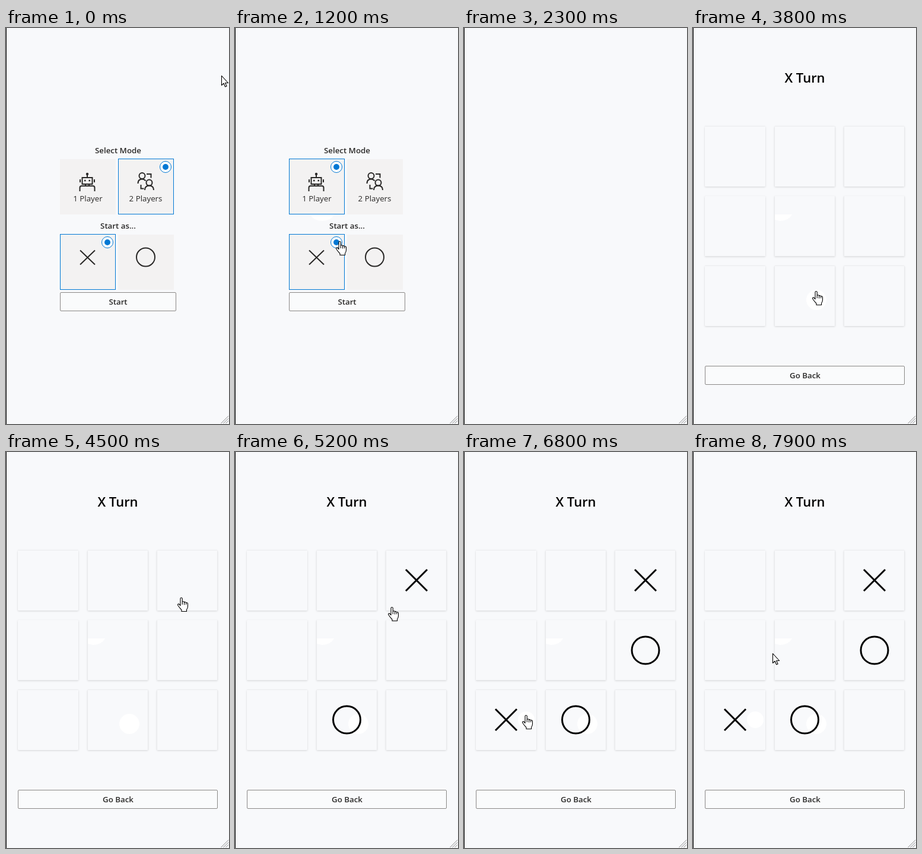
Write an HTML page that moves like this. It is 376 px wide and 667 px high and loops after 8 s.

```html
<!DOCTYPE html>
<html lang="en">
<head>
<meta charset="utf-8">
<title>Tic-tac-toe</title>
<style>
html, body { margin: 0; width: 100%; height: 100%; overflow: hidden; background: #f8f9fb; }
svg { display: block; width: 376px; height: 667px; font: 13.3px "Open Sans", "Noto Sans", sans-serif; }
text { text-anchor: middle; fill: #292827; }
.b { font-weight: 600; }
.line { fill: none; stroke: #292827; stroke-width: 2; }
.mark { fill: none; stroke: #000; stroke-width: 3; }
.tile { fill: #f3f2f2; }
.pick { fill: none; stroke: #0078d4; }
.button { fill: #fafbfc; stroke: #8a8886; }
.cell { fill: #f8f9fb; filter: drop-shadow(0 1.6px 1.8px #0002) drop-shadow(0 .3px .5px #0002); }
.glow { fill: #fff; }
.cursor { fill: #fff; stroke: #000; stroke-width: 1.1; stroke-linejoin: round; }
</style>
</head>
<body>
<svg viewBox="0 0 376 667">
  <defs>
    <g id="pick">
      <rect class="pick" x=".5" y=".5" width="93" height="93"/>
      <circle cx="80" cy="14" r="9.5" fill="#fff" stroke="#0078d4"/>
      <circle cx="80" cy="14" r="5" fill="#0078d4"/>
    </g>
    <path id="x" class="mark" d="M-18-18 18 18M18-18-18 18"/>
    <circle id="o" class="mark" r="23"/>
  </defs>

  <g id="menu">
    <path id="menuGlow" class="glow" d="M126 314h42q-7 11-21 11t-21-11"/>
    <text class="b" x="189" y="211">Select Mode</text>
    <text class="b" x="189" y="338">Start as...</text>
    <path class="tile" d="M91 221h94v93h-94zM189 221h94v93h-94zM91 348h94v93h-94zM189 348h94v93h-94z"/>
    <g class="line">
      <path d="M128.500 252h17v11h-17zM137 252v-5M125 255v5M149 255v5M134 263v3M140 263v3M124.500 275v-6q0-3 3-3h19q3 0 3 3v6"/>
      <path d="M132 257h2.500M139.500 257h2.500" stroke-width="2.600"/>
      <circle cx="137" cy="246" r="1.200"/>
      <circle cx="229.500" cy="249" r="5"/>
      <path d="M222.500 262q0-7.500 7-7.500 4 0 6 3M237 246h7.500v6.500M227.500 264v6.500h5"/>
      <circle cx="241.500" cy="260.500" r="5"/>
      <path d="M234 273q0-7.500 7.500-7.500t7.500 7.500"/>
      <path d="M125 374.500 150 398.500M150 374.500 125 398.500"/>
      <circle cx="235.500" cy="386" r="15.500"/>
    </g>
    <text x="138" y="292">1 Player</text>
    <text x="235.500" y="292">2 Players</text>
    <use id="mode" href="#pick" y="220"/>
    <use href="#pick" x="91" y="347"/>
    <rect class="button" x="91.500" y="445.500" width="195" height="31" rx="1.500"/>
    <text class="b" x="189" y="466">Start</text>
  </g>

  <g id="board">
    <text class="b" x="188.500" y="92" font-size="22" style="fill:#000">X Turn</text>
    <g id="cells"></g>
    <path class="glow" d="M138 314h29q-6 11-20 11l-9-2z"/>
    <circle class="glow" cx="208" cy="458" r="17"/>
    <g id="marks"></g>
    <rect class="button" x="20.500" y="569.500" width="336" height="31" rx="1.500"/>
    <text class="b" x="189" y="590">Go Back</text>
  </g>

  <path d="M.5 0v667" stroke="#111"/>
  <path d="M362.500 666 375 653.500M366.500 666 375 657.500M370.500 666 375 661.500" stroke="#888"/>
  <circle id="press" class="glow" cx="297" cy="257" r="17"/>
  <g id="pointer" class="cursor">
    <path id="arrow" d="M.5.5v16l3.600-3.300 2.500 5.800 2.500-1.100-2.500-5.400h5z"/>
    <path id="hand" d="M-.8 14V2Q-.8.500.8.500T2.400 2v6q0-1.200 1.500-1.200T5.500 8.300q0-1 1.500-1t1.500 1.500q0-1 1.400-1t1.500 1.600V15q0 3-2 5.200v3.200H.8v-3Q-1-18-.8 20-3 17-5.200 13.200-6 11.500-4.500 11T-.8 14z"/>
  </g>
</svg>
<script>
const $ = id => document.getElementById(id);
const LOOP = 8000;

const cols = [20, 137.5, 254.5], rows = [165.5, 283, 400.5], SIZE = 102;
$("cells").innerHTML = rows.map(y => cols.map(x =>
  `<rect class="cell" x="${x}" y="${y}" width="${SIZE}" height="101.5" rx="1"/>`).join("")).join("");

// time, kind, x, y
const moves = [
  [4700, "x", 306, 216], [4700, "o", 188.5, 451],
  [6700, "x", 71, 451], [6700, "o", 306, 334]
];
$("marks").innerHTML = '<circle class="glow" cx="105" cy="451" r="14"/>' +
  moves.map(([, kind, x, y]) => `<use href="#${kind}" x="${x}" y="${y}"/>`).join("");
const [lateGlow, ...marks] = $("marks").children;

// time and tip of the pointer
const track = [
  [0, 363, 80], [600, 147, 300], [700, 147, 300], [1600, 196, 401],
  [1900, 208, 458], [3000, 208, 458], [3100, 207, 443], [3800, 207, 443],
  [4500, 295, 245], [4600, 295, 245], [5500, 253, 266], [5600, 252, 266],
  [5700, 252, 266], [6000, 243, 268], [6600, 104, 443], [7300, 104, 443],
  [7700, 130, 318], [7900, 134, 339], [8000, 134, 339]
];

$("hand").setAttribute("d",
  "M-1 14V2Q-1 .5.6.5T2.300 2V8Q2.500 6.800 4 6.800T5.600 8.500Q6 7.500 7.300 7.700T8.700 9.300" +
  "Q9 8.500 10.200 8.800T11.500 10.500V15Q11.500 18 9.500 20.500V23.500H1V21Q-2 18-5 13.500-6 11.700-4.500 11T-1 14" +
  "M2.300 8v4M5.600 8.500v4M8.700 9.300v3");

function tipAt(t) {
  const i = track.findIndex(k => k[0] > t);
  const [t0, x0, y0] = track[i - 1], [t1, x1, y1] = track[i];
  const u = (t - t0) / (t1 - t0), s = u * u * (3 - 2 * u);
  return [x0 + (x1 - x0) * s, y0 + (y1 - y0) * s].map(Math.round);
}

const inside = (x, y, left, top, w, h) => x > left && x < left + w && y > top && y < top + h;

function overTarget(x, y, playing) {
  return playing
    ? cols.some(l => rows.some(r => inside(x, y, l, r, SIZE, SIZE)))
    : [91, 189].some(l => [220, 347].some(r => inside(x, y, l, r, 94, 94))) ||
      inside(x, y, 91, 445, 196, 32);
}

const show = (el, on) => el.style.display = on ? "" : "none";
const clamp = v => Math.max(0, Math.min(1, v));

function draw(now) {
  const t = Math.floor(now % LOOP / 100) * 100;
  const playing = t >= 3100;
  $("menu").style.opacity = clamp((2300 - t) / 300);
  $("board").style.opacity = clamp((t - 3000) / 200);
  show($("menu"), !playing);
  show($("board"), playing);
  show($("menuGlow"), t >= 800);
  show($("press"), t === 4600);
  show(lateGlow, t >= 6600);
  $("mode").setAttribute("x", t < 900 ? 189 : 91);
  marks.forEach((m, i) => show(m, t >= moves[i][0]));

  const [x, y] = tipAt(t), hand = overTarget(x, y, playing);
  $("pointer").setAttribute("transform", `translate(${x} ${y})`);
  show($("pointer"), t < 2200 || playing);
  show($("hand"), hand);
  show($("arrow"), !hand);
  requestAnimationFrame(draw);
}
requestAnimationFrame(draw);
</script>
</body>
</html>
```
